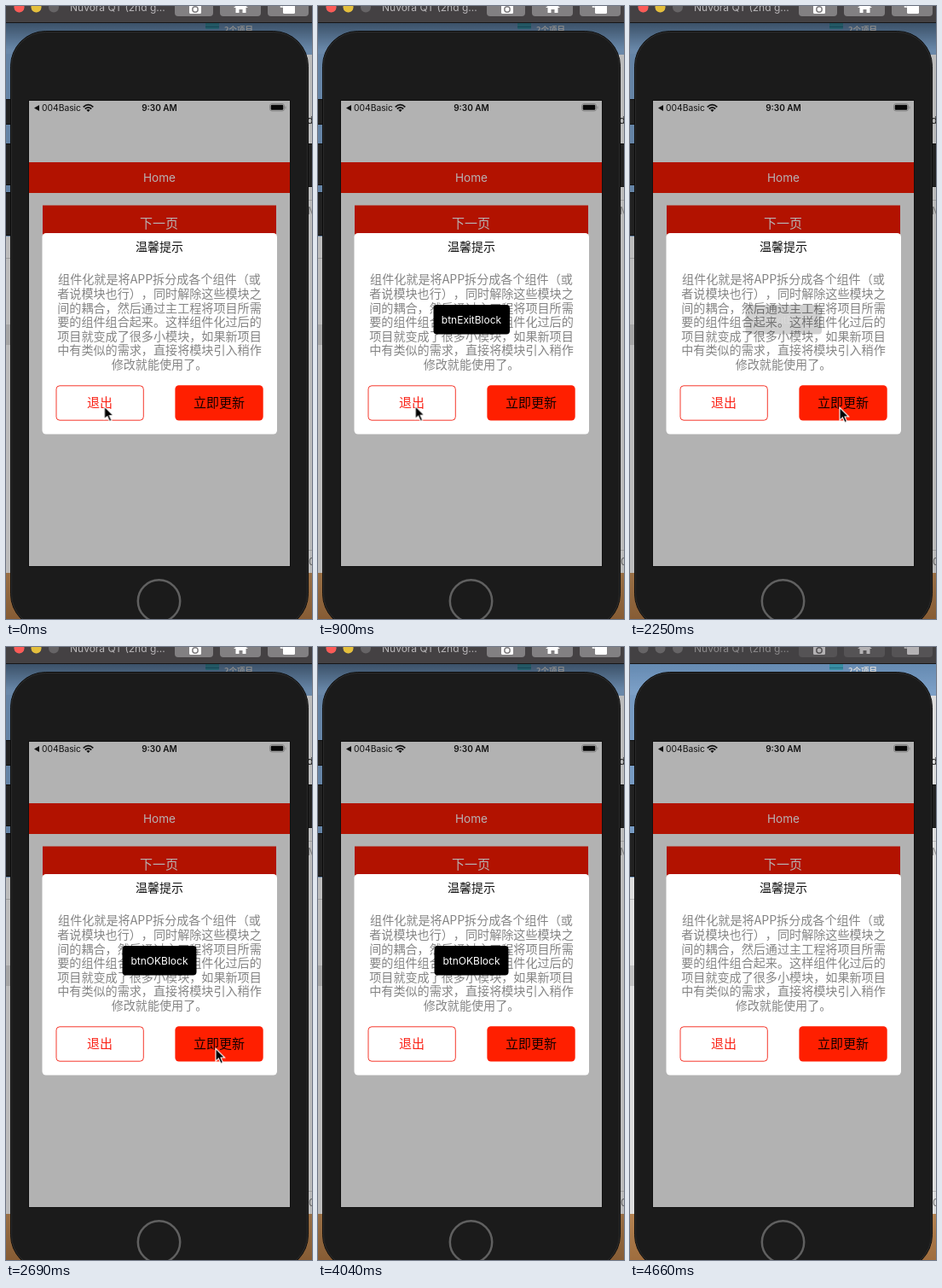
Recreate the animation shown at these times as an HTML page. Size 359x718 px, loop 4.76 s.

```html
<!DOCTYPE html>
<html lang="zh-CN">
<head>
<meta charset="utf-8">
<title>Dialog demo</title>
<style>
html, body { margin: 0; width: 100%; height: 100%; overflow: hidden; background: #1c1c1c; }
svg { display: block; width: 359px; height: 718px; }
text { font-family: Inter, "Noto Sans CJK SC", "Noto Sans CJK", sans-serif; text-spacing-trim: space-all; }
.cjk { font-family: "Noto Sans CJK SC", "Noto Sans CJK", sans-serif; }
.mid { text-anchor: middle; }
.off { fill-opacity: 0; }
#bar { --bar: #444143; --btn: #828082; --icon: #fff; --label: #b8b6b8; }
</style>
</head>
<body>
<svg viewBox="0 0 359 718">
  <defs>
    <linearGradient id="sky" x1="0" y1="0" x2="0" y2="1">
      <stop offset="0" stop-color="#6f9dcd"/><stop offset="1" stop-color="#86abd4"/>
    </linearGradient>
    <linearGradient id="shade" x1="0" y1="0" x2="0" y2="1">
      <stop offset="0" stop-color="#000" stop-opacity=".38"/><stop offset="1" stop-color="#000" stop-opacity="0"/>
    </linearGradient>
    <linearGradient id="sand" x1="0" y1="0" x2="0" y2="1">
      <stop offset="0" stop-color="#c08c58"/><stop offset="1" stop-color="#a97442"/>
    </linearGradient>
  </defs>

  <!-- desktop -->
  <rect width="359" height="718" fill="#ececec"/>
  <rect width="359" height="57" fill="url(#sky)"/>
  <rect y="56" width="8" height="214" fill="#7fa5d0"/>
  <rect y="664" width="359" height="54" fill="url(#sand)"/>
  <path d="M0 295.5H6M353 227.5H359M353 637.5H359" stroke="#c4c4c4"/>
  <rect y="373" width="6" height="24" fill="#cfcfcf"/>
  <rect x="234" y="18" width="16" height="9" rx="1" fill="#42a5bd"/>
  <path d="M234 24.5H250" stroke="#2b7f98"/>
  <text class="cjk" x="256" y="31" font-size="9.5" font-weight="700" fill="#f2f5f8">2个项目</text>
  <g font-size="12" fill="#222">
    <text x="353" y="138">d</text>
    <text x="354" y="244" fill="#999">M</text>
    <text x="355" y="655" fill="#777">0</text>
  </g>
  <g id="shadow">
    <rect width="359" height="718" fill="#000" opacity=".2"/>
    <rect y="19" width="359" height="32" fill="url(#shade)"/>
  </g>

  <!-- title bar -->
  <g id="bar">
    <rect width="359" height="19" fill="var(--bar)"/>
    <path d="M0 19.5H359" stroke="#171617"/>
    <g fill="#666466"><circle cx="15.5" cy="1.5" r="6"/><circle cx="35.5" cy="1.5" r="6"/><circle cx="56" cy="1.5" r="6"/></g>
    <g id="lights"><circle cx="15.5" cy="1.5" r="6" fill="#fc5b57"/><circle cx="35.5" cy="1.5" r="6" fill="#e5bf3c"/></g>
    <text x="75" y="6" font-size="12" fill="var(--label)">Nuvora QT (2nd g...</text>
    <g fill="var(--btn)">
      <rect x="198" y="-10" width="45" height="22" rx="4"/>
      <rect x="251" y="-10" width="48" height="22" rx="4"/>
      <rect x="307" y="-10" width="48" height="22" rx="4"/>
    </g>
    <g fill="var(--icon)">
      <rect x="215" y="-2" width="14" height="11" rx="1.5"/>
      <path d="M267 2L275.5 -5L284 2H281.5V8H277.5V4H273.5V8H269.5V2Z"/>
      <rect x="325" y="-3" width="14" height="12" rx="1.5"/>
    </g>
    <circle cx="222" cy="4" r="3.2" fill="none" stroke="var(--btn)" stroke-width="1.5"/>
    <path d="M322.5 -4V1H326" fill="none" stroke="var(--icon)" stroke-width="1.5"/>
  </g>

  <!-- phone -->
  <g fill="#222" stroke="#101010">
    <rect x="-3" y="109.5" width="10" height="29" rx="2"/>
    <rect x="-3" y="161.5" width="10" height="48" rx="2"/>
    <rect x="-3" y="218.5" width="10" height="50" rx="2"/>
    <rect x="352" y="161.5" width="10" height="50" rx="2"/>
  </g>
  <rect x="5.5" y="29.5" width="349" height="700" rx="41" fill="#1b1b1b" stroke="#0b0b0b"/>
  <rect x="6.5" y="30.5" width="347" height="698" rx="40" fill="none" stroke="#2c2c2c"/>
  <circle cx="179.5" cy="697" r="24.7" fill="none" stroke="#606060" stroke-width="2.5"/>
  <rect x="26.5" y="110.5" width="307" height="546" fill="#b2b2b2" stroke="#111"/>

  <!-- status bar -->
  <path d="M33 119.5L39 116V123Z" fill="#111"/>
  <text x="42" y="123" font-size="10.3" fill="#111">004Basic</text>
  <path d="M90.7 118.3Q96.5 113 102.3 118.3M92.8 120.5Q96.5 117.2 100.2 120.5" fill="none" stroke="#111" stroke-width="1.8"/>
  <path d="M94.3 121.8Q96.5 120 98.7 121.8L96.5 124Z" fill="#111"/>
  <text class="mid" x="180" y="123" font-size="10" font-weight="600" fill="#111">9:30 AM</text>
  <rect x="309.5" y="114.5" width="17" height="8.5" rx="2.5" fill="none" stroke="#858585"/>
  <rect x="310.7" y="115.7" width="14.6" height="6" rx="1.2" fill="#080808"/>
  <path d="M328 117.5V120.5" stroke="#858585"/>

  <!-- page -->
  <rect x="27" y="183" width="306" height="36" fill="#b21200"/>
  <text class="mid" x="180" y="206" font-size="13.6" fill="#b8b2b1">Home</text>
  <rect x="43" y="233.5" width="274" height="36" fill="#b21200"/>
  <text class="mid cjk" x="179.5" y="259.5" font-size="15" fill="#b8b2b1">下一页</text>

  <!-- dialog -->
  <rect x="42.5" y="266" width="275.5" height="235.5" rx="4.5" fill="#fff"/>
  <text class="mid cjk" x="180" y="286.7" font-size="14" font-weight="500" fill="#111">温馨提示</text>
  <g id="body" class="mid" font-size="14.1" fill="#858585"></g>
  <rect x="59" y="444.8" width="102.3" height="40.4" rx="4" fill="#fff" stroke="#f5382c"/>
  <text class="mid cjk" x="110" y="470" font-size="15" fill="#fa2216">退出</text>
  <rect x="198.4" y="444.3" width="103.3" height="41.3" rx="4.5" fill="#ff1f00"/>
  <text class="mid cjk" x="250" y="470" font-size="15" fill="#100">立即更新</text>

  <!-- toasts -->
  <g id="exitToast" class="off">
    <rect x="135.5" y="350" width="89.5" height="34.5" rx="4"/>
    <text class="mid" x="180" y="371.7" font-size="12" fill="#fff">btnExitBlock</text>
  </g>
  <g id="okToast" class="off">
    <rect x="136.5" y="350" width="87" height="34.5" rx="4"/>
    <text class="mid" x="180" y="371.7" font-size="12" fill="#fff">btnOKBlock</text>
  </g>

  <path id="cursor" d="M0 0V15L3.4 11.8L6 17.5L8.5 16.4L6 10.8H10.7Z" stroke="#fff" stroke-width="1.1"/>
</svg>
<script>
const LOOP = 4760;
const $ = id => document.getElementById(id);

const lines = [
  "组件化就是将APP拆分成各个组件（或",
  "者说模块也行），同时解除这些模块之",
  "间的耦合，然后通过主工程将项目所需",
  "要的组件组合起来。这样组件化过后的",
  "项目就变成了很多小模块，如果新项目",
  "中有类似的需求，直接将模块引入稍作",
  "修改就能使用了。"
];
lines.forEach((line, i) => {
  const t = document.createElementNS("http://www.w3.org/2000/svg", "text");
  t.setAttribute("class", "cjk");
  t.setAttribute("x", 180);
  t.setAttribute("y", 325.4 + i * 16.55);
  t.textContent = line;
  $("body").append(t);
});

// Plays rows of [ms, style] as hard steps.
function play(id, rows) {
  const frames = rows.map(([ms, style]) => ({ offset: ms / LOOP, easing: "step-end", ...style }));
  frames.push({ ...frames[frames.length - 1], offset: 1 });
  const anim = $(id).animate(frames, { duration: LOOP, iterations: Infinity });
  anim.startTime = document.timeline.currentTime;
}

const fade = (rows, prop = "opacity") => rows.map(([ms, value]) => [ms, { [prop]: value }]);
const at = (x, y, opacity = 1) => ({ transform: `translate(${x}px, ${y}px)`, opacity });

// Toast box and label fade separately, so the label dims with its box.
play("exitToast", fade([[0, 0], [750, .6], [900, 1], [2250, .18], [2400, 0]], "fillOpacity"));
play("okToast", fade([[0, 0], [2550, .6], [2690, 1], [4490, .74], [4660, 0]], "fillOpacity"));
play("cursor", [
  [0, at(115.4, 469)],
  [150, at(114.2, 468.6)],
  [1200, at(193.3, 469.6)],
  [1350, at(229.3, 470.3)],
  [1500, at(245.2, 470.3)],
  [1650, at(246, 470.3)],
  [3440, at(269.5, 531.5)],
  [3590, at(269.5, 531.5, 0)]
]);

// The window loses focus at the end of the loop.
const BLUR = 4660;
play("shadow", fade([[0, 1], [BLUR, .3]]));
play("lights", fade([[0, 1], [BLUR, 0]]));
play("bar", [
  [0, { "--bar": "#444143", "--btn": "#828082", "--icon": "#ffffff", "--label": "#b8b6b8" }],
  [BLUR, { "--bar": "#434143", "--btn": "#555355", "--icon": "#b4b2b4", "--label": "#8b898b" }]
]);
</script>
</body>
</html>
```
